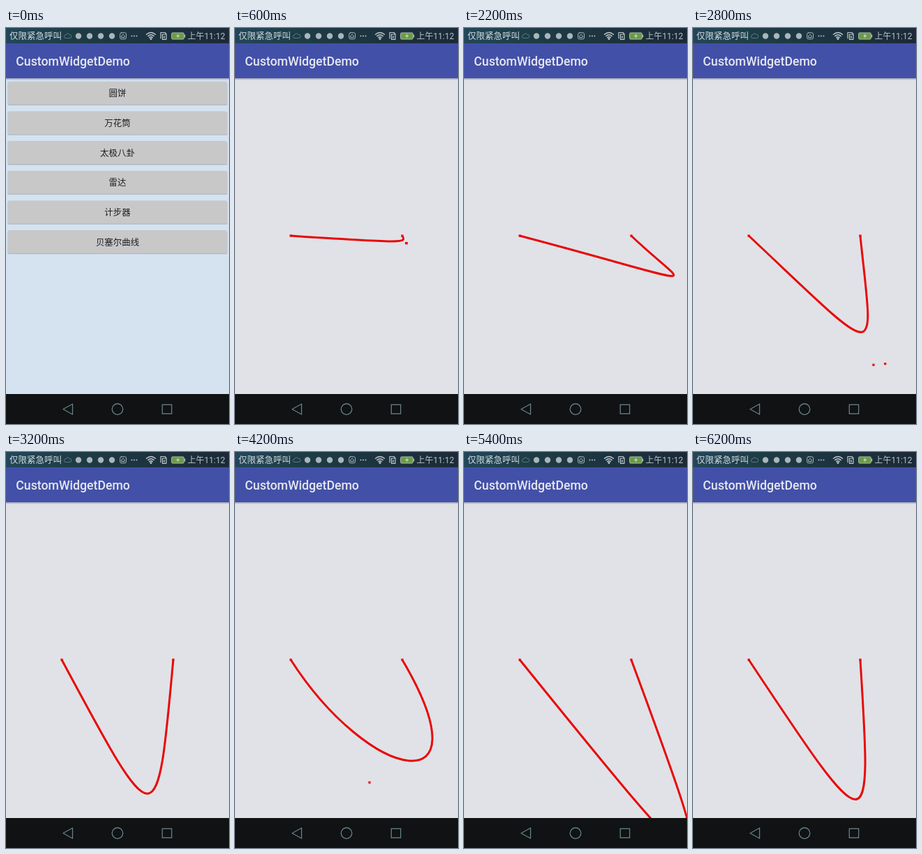
An HTML page for the animation above (6400 ms loop, 320 by 568 pixels).

```html
<!DOCTYPE html>
<html lang="zh">
<head>
<meta charset="utf-8">
<style>
  html, body { margin: 0; width: 100%; height: 100%; overflow: hidden; background: #101214; }
  svg { display: block; width: 320px; height: 568px; }
  text { font-family: Roboto, "Noto Sans CJK SC", "Noto Sans CJK", sans-serif; }
  .line { fill: none; stroke-linecap: round; stroke-linejoin: round; }
</style>
</head>
<body>
<svg viewBox="0 0 320 568">
  <defs>
    <linearGradient id="status">
      <stop offset="0" stop-color="#23475a"/>
      <stop offset=".3" stop-color="#1d3c46"/>
      <stop offset="1" stop-color="#1c2a38"/>
    </linearGradient>
    <linearGradient id="shade" x2="0" y2="1">
      <stop offset="0" stop-color="#6a7090" stop-opacity=".6"/>
      <stop offset="1" stop-color="#6a7090" stop-opacity="0"/>
    </linearGradient>
    <clipPath id="view"><path d="M0 72H320V525H0Z"/></clipPath>
  </defs>

  <rect id="page" y="70" width="320" height="456"/>
  <g id="menu"></g>
  <g id="drawing" clip-path="url(#view)">
    <path id="curve" class="line" stroke="#e80808" stroke-width="3" style="stroke-linecap:butt"/>
    <g id="dots" fill="#e80808"></g>
  </g>

  <rect y="72" width="320" height="3" fill="url(#shade)"/>
  <rect y="22" width="320" height="50" fill="#4250a8"/>
  <text x="14.3" y="54" font-size="17.7" font-weight="500" fill="#e6e7ee">CustomWidgetDemo</text>

  <rect width="320" height="22" fill="url(#status)"/>
  <g fill="#d2dce0" font-size="12.5">
    <text x="5" y="16">仅限紧急呼叫</text>
    <text x="314.5" y="15.6" font-size="12" text-anchor="end" fill="#b9c3c9">上午11:12</text>
  </g>
  <g class="line" stroke="#5f7a80" stroke-width="1">
    <path d="M85.5 14.5a2.2 2.2 0 0 1 0-4.4a3 3 0 0 1 5.4-.8a2.6 2.6 0 0 1 .6 5.2z"/>
    <rect x="163.7" y="6.8" width="8.8" height="9" rx="2" stroke="#a9b6ba"/>
    <path d="M166 11.2l2.1-2 2.1 2v2.3h-4.2z" stroke="#a9b6ba"/>
  </g>
  <g id="badges" fill="#a9b6ba"></g>
  <g fill="#b9c3c9">
    <circle cx="180.5" cy="11.5" r="1"/><circle cx="184" cy="11.5" r="1"/><circle cx="187.5" cy="11.5" r="1"/>
    <circle cx="208" cy="15.6" r="1.5"/>
  </g>
  <g class="line" stroke="#c0cace" stroke-width="1.4">
    <path d="M201.5 9.3Q208 3.7 214.5 9.3M203.7 11.6Q208 8 212.3 11.6M205.7 13.7Q208 11.8 210.3 13.7"/>
    <path d="M222 14.8V6.5H228l2 2M224.5 9h5.5v7.3h-5.5z" stroke-width="1.2"/>
  </g>
  <path d="M227 11.5v3" stroke="#c0cace" stroke-width="1.6"/>
  <rect x="237.6" y="6.9" width="17.8" height="9.2" rx="1.5" fill="#6a9c46" stroke="#a9b6b0"/>
  <path d="M256.5 9.5v4" stroke="#a9b6b0" stroke-width="1.6"/>
  <path d="M248 8l-4 4h2.6l-1.4 3 4.3-4.2h-2.7z" fill="#cfdcc0"/>

  <rect y="525" width="320" height="43" fill="#101214"/>
  <g class="line" stroke="#668187" stroke-width="1.3">
    <path d="M82 546.8L95.5 539.3V554.3Z"/>
    <circle cx="160" cy="546.8" r="7.8"/>
    <rect x="224.3" y="540.3" width="13.4" height="13" stroke-linejoin="miter"/>
  </g>
</svg>
<script>
const LOOP = 6400, STEP = 200, OPEN = 400;
const A = [80, 298], B = [240, 298];
const labels = ["圆饼", "万花筒", "太极八卦", "雷达", "计步器", "贝塞尔曲线"];
// time, first control point, second control point
const path = [
  [400, 230, 300, 230, 300],
  [1200, 293, 334, 295, 335],
  [2200, 364, 373, 322, 377],
  [3200, 217, 554, 217, 554],
  [4200, 193, 474, 364, 508],
  [5400, 375, 663, 375, 663],
  [6200, 257, 565, 257, 565]
];

const $ = id => document.getElementById(id);

function add(parent, tag, attrs, text) {
  const el = document.createElementNS("http://www.w3.org/2000/svg", tag);
  for (const k in attrs) el.setAttribute(k, attrs[k]);
  if (text) el.textContent = text;
  $(parent).append(el);
  return el;
}

labels.forEach((label, i) => {
  const y = 76.8 + i * 42.65;
  const box = { x: 3, width: 314, height: 33, rx: 1.5 };
  add("menu", "rect", { ...box, x: 2.5, width: 315, y: y + 1.3, fill: "#9ca5ae", opacity: .65 });
  add("menu", "rect", { ...box, y, fill: "#c8c8c9" });
  add("menu", "text", {
    x: 160, y: y + 21.6, "font-size": 12.44, "font-weight": 500,
    "text-anchor": "middle", fill: "#1c1e20"
  }, label);
});

for (const x of [104, 120, 136, 152]) add("badges", "circle", { cx: x, cy: 11.5, r: 4.2 });

const dots = [A, B, A, B].map(() => add("dots", "rect", { width: 3.2, height: 3.2 }));

function controls(t) {
  let i = 0;
  while (i < path.length - 2 && t >= path[i + 1][0]) i++;
  const from = path[i], to = path[i + 1];
  const u = Math.min(1, (t - from[0]) / (to[0] - from[0]));
  return from.slice(1).map((v, k) => v + (to[k + 1] - v) * u);
}

function draw(ms) {
  const t = Math.floor((ms % LOOP) / STEP) * STEP;
  const open = t >= OPEN;
  $("menu").style.display = open ? "none" : "";
  $("drawing").style.display = open ? "" : "none";
  $("page").setAttribute("fill", open ? "#e0e2e7" : "#d5e2f0");
  if (!open) return;
  const [x1, y1, x2, y2] = controls(t);
  $("curve").setAttribute("d", `M${A}C${x1} ${y1} ${x2} ${y2} ${B}`);
  [A, B, [x1, y1], [x2, y2]].forEach(([x, y], i) => {
    dots[i].setAttribute("x", x - 1.6);
    dots[i].setAttribute("y", y - 1.6);
  });
}

const start = performance.now();
function tick() {
  draw(performance.now() - start);
  requestAnimationFrame(tick);
}
tick();
</script>
</body>
</html>
```
